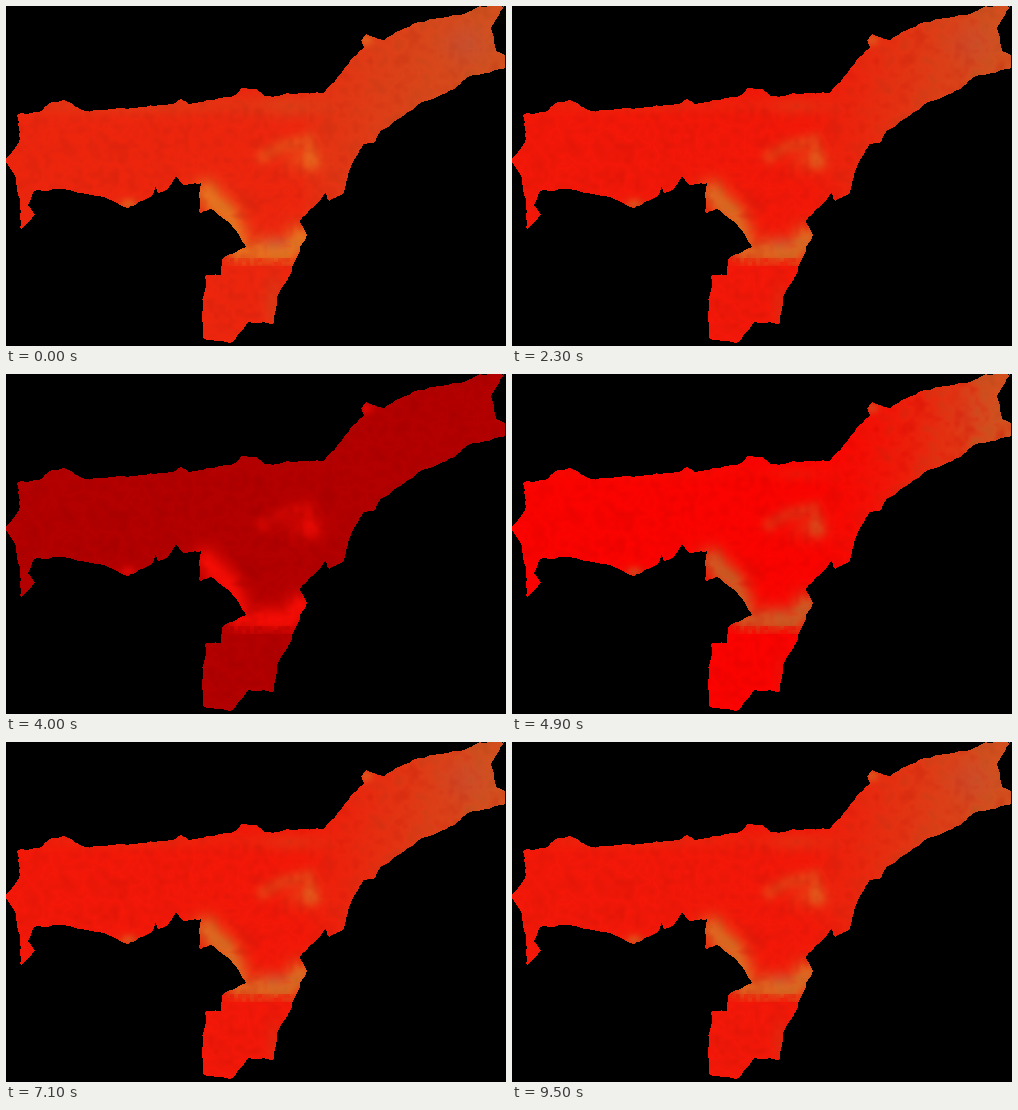
A matplotlib script that plays this animation: 500x340 px, repeating every 9.6 s.

```python
import numpy as np
import matplotlib.pyplot as plt
from matplotlib.animation import FuncAnimation
from matplotlib.path import Path

W, H = 500, 340
FRAMES, STEP = 96, 100
rng = np.random.default_rng(4)
X, Y = np.meshgrid(np.arange(W) + 0.5, np.arange(H) + 0.5)

# Corners of the border, clockwise from the north-west
BORDER = [
    (12, 109), (34, 107), (43, 98), (58, 95), (76, 105), (136, 102),
    (168, 99), (174, 94), (184, 99), (231, 89), (236, 83), (250, 84),
    (259, 91), (318, 88), (346, 53), (359, 41), (356, 34), (360, 29),
    (378, 35), (412, 17), (460, 8), (474, 1), (497, 0), (484, 23),
    (489, 46), (498, 49), (498, 62), (462, 70), (449, 82), (411, 98),
    (374, 124), (368, 136), (357, 137), (341, 168), (337, 186), (323, 194),
    (320, 186), (293, 215), (300, 228), (285, 264), (271, 289), (267, 317),
    (243, 315), (224, 336), (198, 332), (200, 270), (215, 270), (218, 252),
    (241, 241), (226, 218), (205, 202), (194, 206), (196, 176), (178, 178),
    (170, 170), (161, 183), (152, 186), (150, 177), (145, 190), (122, 201),
    (102, 192), (64, 183), (28, 184), (21, 199), (28, 209), (15, 223),
    (15, 198), (11, 172), (0, 154), (14, 136)]


def roughen(ring, amount):
    """Add a displaced midpoint to each side."""
    after = np.roll(ring, -1, axis=0)
    side = after - ring
    normal = np.column_stack([-side[:, 1], side[:, 0]])
    shift = rng.uniform(-amount, amount, (len(ring), 1))
    mids = (ring + after) / 2 + normal * shift
    return np.stack([ring, mids], axis=1).reshape(-1, 2)


def region():
    ring = np.array(BORDER, float)
    for amount in (0.03, 0.06, 0.12):
        ring = roughen(ring, amount)
    path, pixels = Path(ring), np.column_stack([X.ravel(), Y.ravel()])
    shifts = [(-1, 0), (1, 0), (0, -1), (0, 1)]
    return np.any([path.contains_points(pixels + s) for s in shifts],
                  axis=0).reshape(H, W)


def noise(cell):
    """Smooth random field between -1 and 1."""
    gx, gy = np.arange(0, W + cell, cell), np.arange(0, H + cell, cell)
    grid = rng.uniform(-1, 1, (len(gy), len(gx)))
    rows = np.array([np.interp(X[0], gx, row) for row in grid])
    return np.array([np.interp(Y[:, 0], gy, col) for col in rows.T]).T


def blocks(cell):
    grid = rng.uniform(0, 1, (H // cell + 1, W // cell + 1))
    return np.kron(grid, np.ones((cell, cell)))[:H, :W]


def blob(x, y, rx, ry):
    return np.exp(-((X - x) / rx) ** 2 - ((Y - y) / ry) ** 2)


def ridge(points, width):
    """Height that falls off with the distance to a line of points."""
    far = np.full((H, W), np.inf)
    for (x0, y0), (x1, y1) in zip(points, points[1:]):
        dx, dy = x1 - x0, y1 - y0
        s = np.clip(((X - x0) * dx + (Y - y0) * dy) / (dx * dx + dy * dy), 0, 1)
        far = np.minimum(far, np.hypot(X - x0 - s * dx, Y - y0 - s * dy))
    return np.exp(-(far / width) ** 2)


mask = region()
rough = 0.6 * noise(14) + 0.4 * noise(5)

hills = (ridge([(200, 188), (222, 210), (236, 246), (282, 246), (294, 232)], 14)
         + 0.45 * ridge([(258, 150), (276, 140), (302, 134), (306, 156)], 8)
         + 0.4 * blob(298, 154, 18, 14)
         + 0.6 * blob(122, 198, 9, 6) + 0.6 * blob(360, 34, 7, 6))
hills *= 0.95 + 0.3 * rough
edge_row = (Y >= 252) & (Y < 260)
hills = np.where(edge_row, hills * (0.3 + 0.6 * blocks(4)), hills)
hills = np.clip(np.where(Y < 260, hills, 0), 0, 1)

upper = (np.clip((X - 295) / 190, 0, 1) + 0.3 * blob(285, 100, 32, 10)
         + 0.2 * blob(130, 98, 120, 9) + 0.3 * blob(268, 300, 8, 20))
upper = np.clip(upper * (1 + 0.25 * rough), 0, 1)
haze = 0.25 * (blob(460, 38, 22, 20) + blob(270, 237, 14, 8))

# Colours from cold through mild to hot
VALLEY = [(238, 38, 14), (252, 4, 0), (168, 0, 0)]
HILL = [(232, 115, 32), (210, 88, 34), (252, 0, 0)]
UPPER, HAZE = np.array([212, 80, 30]), np.array([172, 88, 92])


def tone(warmth, colours):
    return np.array([np.interp(warmth, [0.08, 0.33, 1], c) for c in zip(*colours)])


def mix(a, b, amount):
    return a + (b - a) * amount[..., None]


def month_map(month):
    warmth = np.sin(np.pi * (month + 0.3) / 12)
    cool = np.clip((0.8 - warmth) / 0.45, 0, 1)
    cold = np.clip((0.4 - warmth) / 0.3, 0, 1)
    img = np.ones((H, W, 3)) * tone(warmth, VALLEY)
    img = mix(img, UPPER, cool * upper ** (0.3 + 4 * warmth))
    img = mix(img, tone(warmth, HILL), hills)
    img = mix(img, HAZE, haze * cold)
    img *= 1 - 0.08 * np.abs(rough)[..., None]
    img[~mask] = 0
    return np.clip(img, 0, 255).astype(np.uint8)


maps = [month_map(m) for m in range(12)]

fig = plt.figure(figsize=(W / 100, H / 100), dpi=100, facecolor="black")
ax = fig.add_axes([0, 0, 1, 1])
ax.axis("off")
picture = ax.imshow(maps[0], interpolation="nearest", aspect="auto")


def draw(i):
    picture.set_data(maps[i % 12])
    return [picture]


anim = FuncAnimation(fig, draw, frames=FRAMES, interval=STEP,
                     repeat=True, repeat_delay=0)
plt.show()
```
